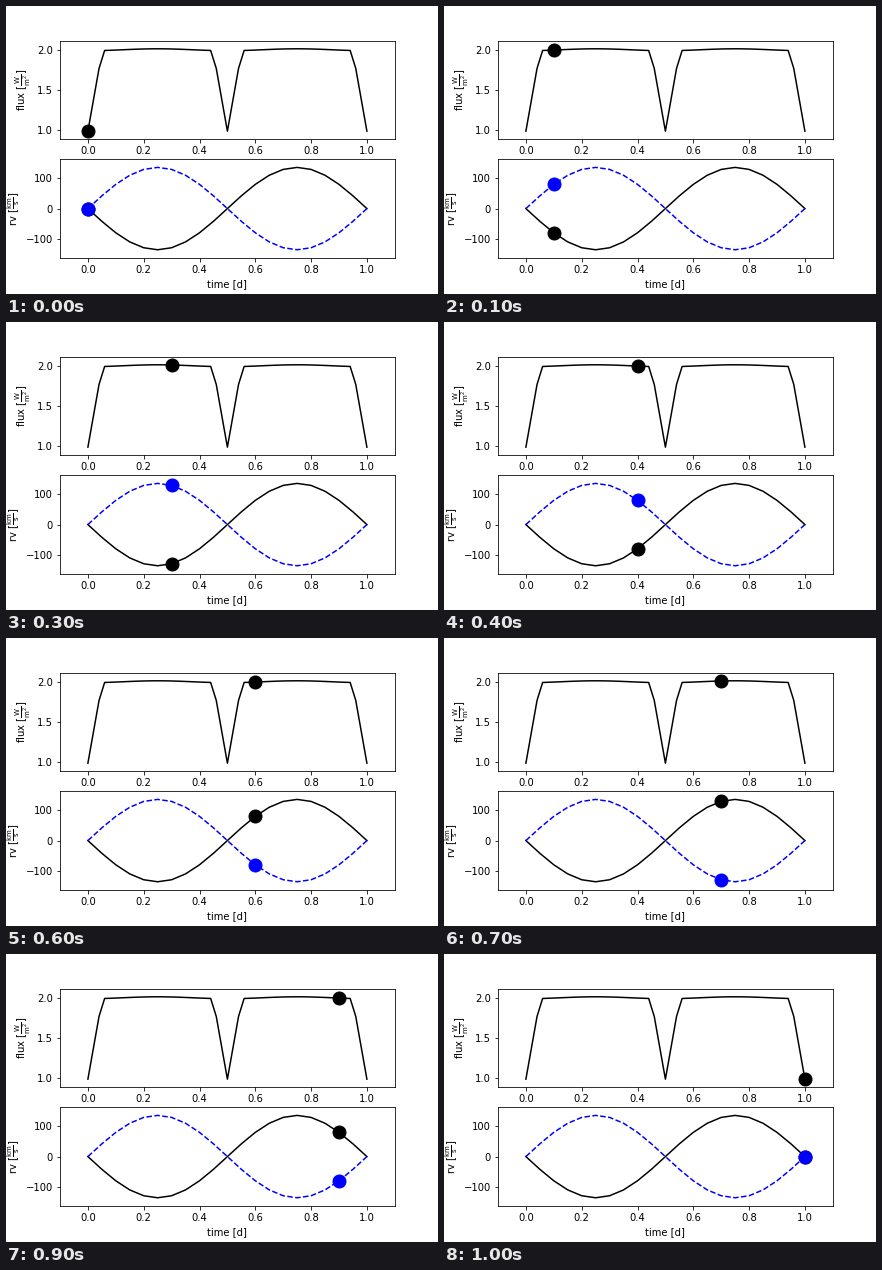
Animation of 432x288 px, one loop 1100 ms. Source, as a matplotlib script:

```python
import numpy as np
import matplotlib.pyplot as plt
from matplotlib.animation import FuncAnimation

STEPS = 11
K = 134.1  # velocity amplitude, km/s


def flux(t):
    """Two equal eclipses per orbit over a weak ellipsoidal variation."""
    phase = np.abs((np.asarray(t) + 0.25) % 0.5 - 0.25)
    full = 2.002 - 0.012 * np.cos(4 * np.pi * phase)
    eclipse = np.interp(phase, [0, 0.04, 0.06], [0.985, 1.77, 1.993])
    return np.where(phase < 0.06, eclipse, full)


def velocity(t):
    return K * np.sin(2 * np.pi * np.asarray(t))


def pad(lo, hi):
    margin = 0.1 * (hi - lo)
    return lo - margin, hi + margin


fig, (top, low) = plt.subplots(2, 1, figsize=(6, 4), dpi=72)
fig.subplots_adjust(left=0.125, right=0.9, bottom=0.125, top=0.88,
                    wspace=0.2, hspace=0.2)

t_flux = np.linspace(0, 1, 51)
t_rv = np.linspace(0, 1, 21)
curves = [
    (top, t_flux, flux, "k", "-"),
    (low, t_rv, lambda t: -velocity(t), "k", "-"),
    (low, t_rv, velocity, "b", "--"),
]

dots = []
for ax, t, f, color, style in curves:
    ax.plot(t, f(t), color=color, ls=style, lw=1.5)
    dot, = ax.plot([], [], "o", color=color, ms=13, zorder=3)
    dots.append((dot, f))

for ax in (top, low):
    ax.set_xlim(-0.1, 1.1)
top.set_ylim(*pad(0.985, 2.014))
low.set_ylim(*pad(-K, K))
top.set_ylabel(r"flux [$\mathrm{\frac{W}{m^{2}}}$]")
low.set_ylabel(r"rv [$\mathrm{\frac{km}{s}}$]")
low.set_xlabel("time [d]")


def update(i):
    t = i / (STEPS - 1)
    for dot, f in dots:
        dot.set_data([t], [float(f(t))])
    return [dot for dot, _ in dots]


anim = FuncAnimation(fig, update, frames=STEPS, interval=100,
                     repeat=True, repeat_delay=0)
plt.show()
```
